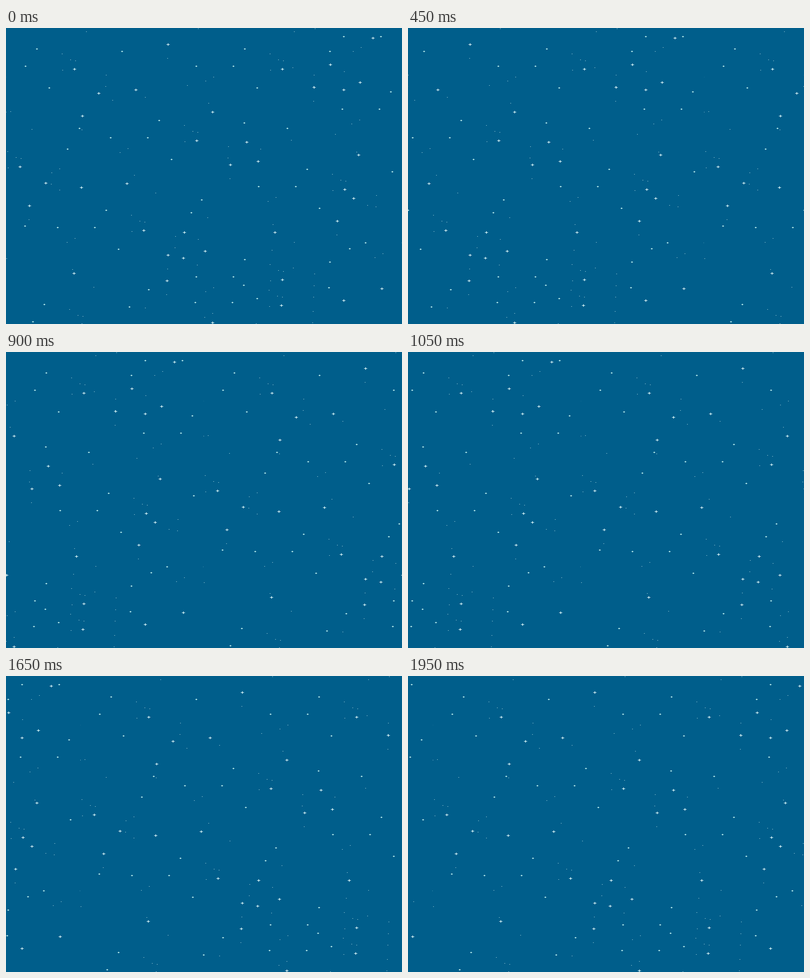
These frames come from a looping animation (800 px wide and 600 px high, 2100 ms). An HTML page with a canvas:

```html
<!DOCTYPE html>
<html>
<head>
<meta charset="utf-8">
<title>Drifting stars</title>
<style>
html, body { margin: 0; width: 100%; height: 100%; overflow: hidden; background: #005e8b; }
canvas { display: block; }
</style>
</head>
<body>
<canvas id="stage" width="800" height="600"></canvas>
<script>
const W = 800, H = 600, STEP = 150, STEPS = 14;
const STRETCH = 1.27; // stars are slightly wider than tall

// One constellation, repeated all over the sky
const large = [[99, 6], [-99, -90], [-132, -44], [-42, 93], [223, 48]];
const medium = [[0, 0], [-75, 0], [23, -35], [195, -30], [48, 44], [109, 126]];
const faint = scatter(13, -178, 191, -117, 79);
const centers = [
  [783, -73], [757, 17], [39, 77], [459, 77], [754, 164], [286, 222], [-71, 275],
  [585, 321], [179, 404], [801, 435], [459, 504], [457, 556], [54, 595]
];

// Seeded random points in a rectangle
function scatter(count, left, right, top, bottom) {
  let seed = 7;
  const random = () => (seed = seed * 16807 % 2147483647) / 2147483647;
  return Array.from({ length: count }, () => [
    Math.round(left + (right - left) * random()),
    Math.round(top + (bottom - top) * random())
  ]);
}

const sky = document.createElement('canvas');
sky.width = W;
sky.height = H;
const pen = sky.getContext('2d');

function drawStar(x, y, arm, color) {
  const span = 2 * arm + 1;
  const bar = (w, h) => pen.fillRect(x + 0.5 - w * STRETCH / 2, y + 0.5 - h / 2, w * STRETCH, h);
  pen.fillStyle = color;
  bar(span, 1);
  if (arm) bar(1, span);
}

for (const [cx, cy] of centers) {
  const draw = (stars, arm, color) =>
    stars.forEach(([x, y]) => drawStar(cx + x, cy + y, arm, color));
  draw(large, 2, '#e4ffff');
  draw(medium, 1, '#c0f4f2');
  draw(faint, 0, '#c0e8ea');
}

// Steady drift to the left that skips ahead twice near the start
function driftAt(time) {
  const n = Math.floor(time / STEP) % STEPS;
  const k = n + Math.min(2, n >> 1);
  return k ? Math.round(2.5 + 49.83 * k) : 0;
}

const ctx = document.getElementById('stage').getContext('2d');

function frame() {
  const shift = driftAt(performance.now());
  ctx.fillStyle = '#005e8b';
  ctx.fillRect(0, 0, W, H);
  ctx.drawImage(sky, -shift, 0);
  ctx.drawImage(sky, W - shift, 0);
  requestAnimationFrame(frame);
}
frame();
</script>
</body>
</html>
```
